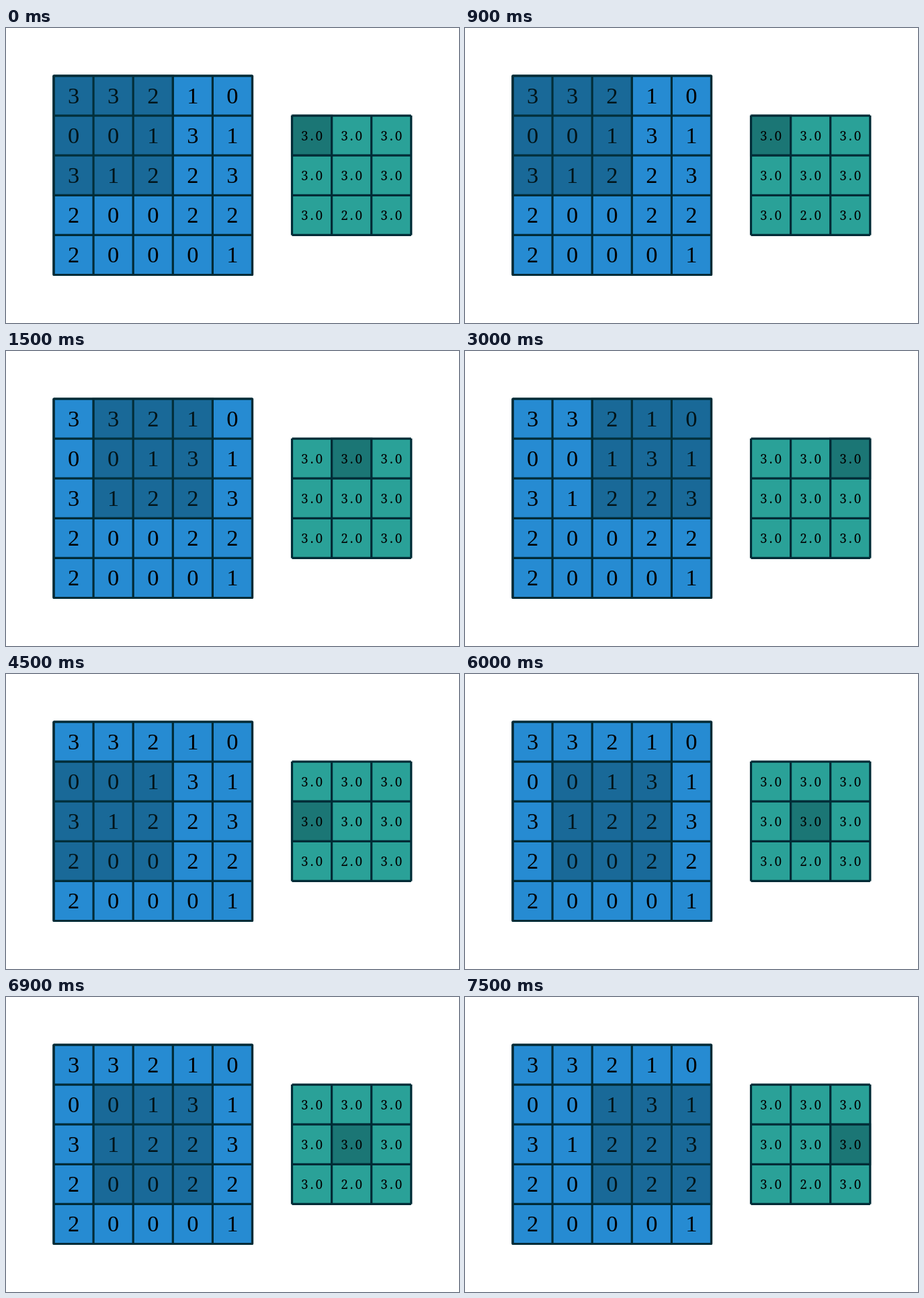
An HTML page with a canvas for the animation above (8 s loop, 674 by 438 pixels).

```html
<!DOCTYPE html>
<html lang="en">
<head>
<meta charset="utf-8">
<title>3×3 max pooling</title>
<style>
html, body { margin: 0; width: 100%; height: 100%; overflow: hidden; background: #fff; }
canvas { display: block; }
</style>
</head>
<body>
<canvas id="stage" width="674" height="438"></canvas>
<script>
const ctx = document.getElementById('stage').getContext('2d');
const CELL = 59.1, LINE = 3.2, STEP = 1500, LOOP = 8000;
const INK = '#002b36', SHADE = '#073642';

const input = {
  x: 71, y: 71, fill: '#268bd2', font: '34.5px "Liberation Serif", serif',
  spacing: 0, drop: 11,
  rows: ['33210', '00131', '31223', '20022', '20001'].map(r => [...r])
};
const output = {
  x: 425.5, y: 130.1, fill: '#2aa198', font: '19px "Noto Serif", serif',
  spacing: 3, drop: 7,
  rows: [[3, 3, 3], [3, 3, 3], [3, 2, 3]].map(r => r.map(v => v.toFixed(1)))
};

function drawGrid({ x, y, fill, rows }) {
  const n = rows.length, size = n * CELL;
  ctx.fillStyle = fill;
  ctx.fillRect(x, y, size, size);
  ctx.strokeStyle = INK;
  ctx.lineWidth = LINE;
  ctx.beginPath();
  for (let i = 0; i <= n; i++) {
    const d = i * CELL;
    ctx.moveTo(x + d, y);
    ctx.lineTo(x + d, y + size);
    ctx.moveTo(x, y + d);
    ctx.lineTo(x + size, y + d);
  }
  ctx.stroke();
}

function drawValues({ x, y, font, spacing, drop, rows }) {
  ctx.font = font;
  ctx.letterSpacing = spacing + 'px';
  ctx.textAlign = 'center';
  ctx.fillStyle = '#000';
  rows.forEach((row, r) => row.forEach((value, c) => {
    // letter spacing also trails the last glyph
    ctx.fillText(value, x + (c + 0.5) * CELL + spacing / 2, y + (r + 0.5) * CELL + drop);
  }));
}

function shade({ x, y }, col, row, span) {
  const box = [x + col * CELL, y + row * CELL, span * CELL, span * CELL];
  ctx.globalAlpha = 0.4;
  ctx.fillStyle = SHADE;
  ctx.fillRect(...box);
  ctx.strokeStyle = INK;
  ctx.lineWidth = LINE;
  ctx.lineJoin = 'miter';
  ctx.strokeRect(...box);
  ctx.globalAlpha = 1;
}

function draw(now) {
  const step = Math.floor((now % LOOP) / STEP);
  const col = step % 3, row = Math.floor(step / 3);
  ctx.fillStyle = '#fff';
  ctx.fillRect(0, 0, 674, 438);

  drawGrid(input);
  ctx.lineJoin = 'round';
  ctx.strokeRect(input.x, input.y, 5 * CELL, 5 * CELL);
  drawValues(input);
  shade(input, col, row, 3);

  drawGrid(output);
  shade(output, col, row, 1);
  drawValues(output);
}

const start = performance.now();
function tick() {
  draw(performance.now() - start);
  requestAnimationFrame(tick);
}
tick();
</script>
</body>
</html>
```
